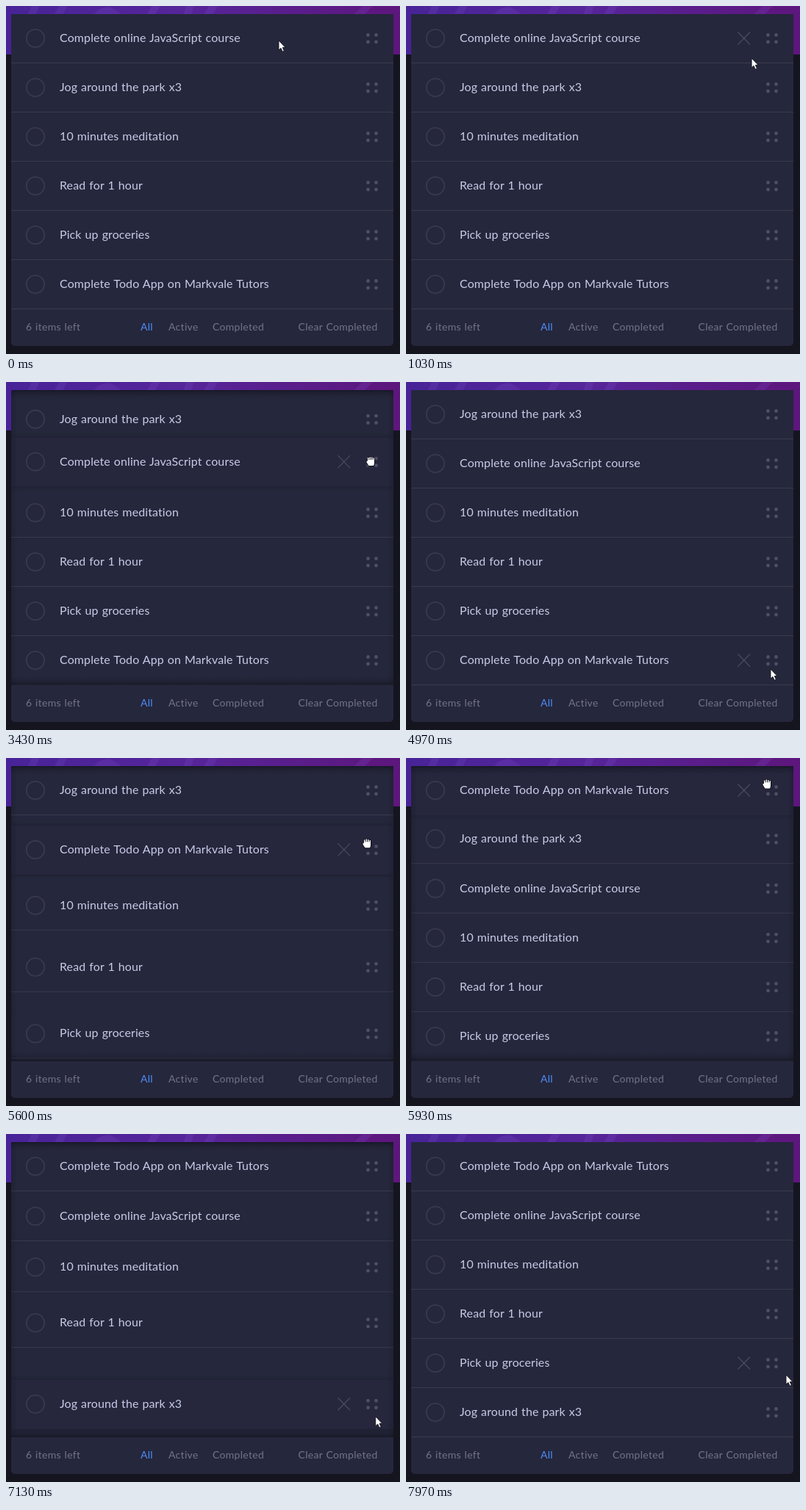
Animation, 536 px wide and 474 px high, one loop 8000 ms. Source, as an HTML page:

```html
<!DOCTYPE html>
<html lang="en">
<head>
<meta charset="utf-8">
<title>Todo list</title>
<style>
  html, body { margin: 0; width: 100%; height: 100%; overflow: hidden; background: #14151e; }
  svg { display: block; width: 100%; height: 100%; }
  text { font-family: Lato, sans-serif; white-space: pre; }
  .task { font-size: 16px; letter-spacing: .1px; word-spacing: .8px; fill: #c8cbe7; }
  .foot { font-size: 14px; letter-spacing: .3px; word-spacing: .8px; fill: #737489; }
</style>
</head>
<body>
<svg id="stage" viewBox="0 0 536 474">
  <defs>
    <linearGradient id="sky">
      <stop offset="0" stop-color="#482398"/>
      <stop offset=".45" stop-color="#56259a"/>
      <stop offset="1" stop-color="#5d167c"/>
    </linearGradient>
    <linearGradient id="fadeY" x2="0" y2="1">
      <stop offset="0" stop-color="#0b0c14" stop-opacity=".55"/>
      <stop offset=".35" stop-color="#0b0c14" stop-opacity=".22"/>
      <stop offset="1" stop-color="#0b0c14" stop-opacity="0"/>
    </linearGradient>
    <linearGradient id="fadeX">
      <stop offset="0" stop-color="#0b0c14" stop-opacity=".18"/>
      <stop offset="1" stop-color="#0b0c14" stop-opacity="0"/>
    </linearGradient>
    <filter id="lift" x="-5%" y="-30%" width="110%" height="160%">
      <feDropShadow dx="0" dy="0" stdDeviation="4.5" flood-color="#0b0c14" flood-opacity=".28"/>
    </filter>
    <clipPath id="list"><path d="M7 11H527V413H7z"/></clipPath>
  </defs>
  <path d="M0 0H536V66H0z" fill="url(#sky)"/>
  <path d="M34 14L42-4M70 14L80-4M122 16Q136-2 152 14M196 14L206-4M246 14L252-4M272 16L286-6M478 14L496-4"
    fill="none" stroke="#8b5cd6" stroke-width="10" opacity=".17"/>
  <rect x="7" y="11" width="520" height="452" rx="5" fill="#25273c"/>
  <g id="footer" class="foot"></g>
  <g clip-path="url(#list)">
    <g id="rows"></g>
    <g id="inset">
      <path d="M0 0H520V12H0z" transform="translate(7 11)" fill="url(#fadeY)"/>
      <path d="M0 0H520V12H0z" transform="matrix(1 0 0 -1 7 413)" fill="url(#fadeY)"/>
      <path d="M0 0H9V402H0z" transform="translate(7 11)" fill="url(#fadeX)"/>
      <path d="M0 0H9V402H0z" transform="matrix(-1 0 0 1 527 11)" fill="url(#fadeX)"/>
    </g>
  </g>
  <g id="cursor" fill="#fff" stroke="#11121b" stroke-width=".9" stroke-linejoin="round">
    <path id="arrow" d="M0 0V13L3 10.4L5.2 15.2L7.4 14.2L5.3 9.6H9z"/>
    <path id="open" transform="scale(1.1)" d="M-3 7.5L-6.5 2q-1.5-2.5 .5-2.5l2 2V-5a1.1 1.1 0 0 1 2.2 0v-1.5a1.1 1.1 0 0 1 2.2 0v1a1.1 1.1 0 0 1 2.2 0v2a1.1 1.1 0 0 1 2.2 0V2q0 3-1.5 5.5zM-1.8-5V0M.4-5.5V0M2.6-4V0"/>
    <path id="fist" transform="translate(.6 0) scale(1.15)" d="M-3 6L-5.5 2q-1-2.5 1-2.5V-3.5a1.1 1.1 0 0 1 2.2 0v-.8a1.1 1.1 0 0 1 2.2 0v.4a1.1 1.1 0 0 1 2.2 0v.8a1.1 1.1 0 0 1 2.2 0V2q0 2.5-1.2 4zM-2.3-3.5V-1.5M-.1-4V-1.5M2.1-3.5V-1.5"/>
  </g>
</svg>
<script>
const LOOP = 8000, STEP = 67, TOP = 44, SWAP = 31;
const $ = id => document.getElementById(id);
const show = (el, on) => { el.style.display = on ? '' : 'none'; };
const slot = i => TOP + i * STEP;

const tasks = [
  'Complete online JavaScript course', 'Jog around the park x3', '10 minutes meditation',
  'Read for 1 hour', 'Pick up groceries', 'Complete Todo App on Markvale Tutors'
];

// Pointer stops: time, x, y
const stops = [
  [0, 371, 47], [230, 371, 47], [1030, 470, 71], [1500, 508, 53], [1870, 497, 42],
  [3050, 497, 43], [3480, 496, 110], [3900, 496, 110], [4700, 497, 338], [4970, 496, 391],
  [5110, 495, 370], [5460, 494, 325], [5600, 491, 117], [5700, 491, 35], [6400, 491, 35],
  [6820, 499, 128], [6870, 499, 187], [7180, 503, 393], [7500, 503, 393], [7970, 517, 328]
];

const cursors = [
  [1900, 'arrow'], [2450, 'open'], [3900, 'fist'], [5020, 'arrow'],
  [5110, 'open'], [6150, 'fist'], [LOOP, 'arrow']
];

function slope(i, k) {
  const secant = j => (stops[j + 1][k] - stops[j][k]) / (stops[j + 1][0] - stops[j][0]);
  if (i < 1 || i > stops.length - 2) return 0;
  const a = secant(i - 1), b = secant(i);
  return a * b > 0 ? 2 * a * b / (a + b) : 0;
}

// Monotone cubic through the stops
function pointer(t, k) {
  const next = stops.findIndex(s => s[0] > t);
  if (next < 0) return stops[stops.length - 1][k];
  const a = stops[next - 1], b = stops[next];
  const h = b[0] - a[0], u = (t - a[0]) / h, v = 1 - u;
  return a[k] * (1 + 2 * u) * v * v + b[k] * u * u * (3 - 2 * u)
    + h * u * v * (slope(next - 1, k) * v - slope(next, k) * u);
}

// Neighbours give way as the dragged row reaches the middle of each one
const order = tasks.map((_, i) => i);
function makeDrag(from, to, t0, t1) {
  const dir = Math.sign(to - from), grab = pointer(t0, 2);
  const swaps = [];
  let at = t0;
  for (let k = 0; k < Math.abs(to - from); k++) {
    while (at < t1 && dir * (pointer(at, 2) - grab) < k * STEP + SWAP) at++;
    swaps.push([order[from + dir * (k + 1)], at]);
  }
  const [id] = order.splice(from, 1);
  order.splice(to, 0, id);
  return { id, to, t0, t1, dir, swaps, off: slot(from) - grab };
}
const drags = [
  makeDrag(0, 1, 3050, 3830),
  makeDrag(5, 0, 5110, 6150),
  makeDrag(1, 5, 6820, 7500)
];

function spring(ms) {
  const q = Math.max(0, ms) * .022;
  return 1 - (1 + q) * Math.exp(-q);
}

const rows = tasks.map(label => {
  const g = document.createElementNS('http://www.w3.org/2000/svg', 'g');
  const dots = [492.5, 503.5].map(x => [-4.5, 5].map(y =>
    `<circle cx="${x}" cy="${y}" r="2.4" fill="#4d5067"/>`).join('')).join('');
  g.innerHTML = `<path d="M7-33H527V34H7z" fill="#25273c"/>
    <path class="line" d="M7 33.5H527" stroke="#393a4c"/>
    <circle cx="40" r="12.2" fill="none" stroke="#393a4c" stroke-width="1.8"/>
    <text class="task" x="73" y="5">${label}</text>
    <path class="close" d="M451.5-8.5L468 8.5M468-8.5L451.5 8.5" stroke="#494c63" stroke-width="1.2"/>${dots}`;
  $('rows').append(g);
  return { g, line: g.querySelector('.line'), close: g.querySelector('.close') };
});

$('footer').innerHTML = [[27, '6 items left'], [183, 'All', '#4f8df8'], [221, 'Active'],
  [281, 'Completed'], [397.5, 'Clear Completed']].map(([x, s, c]) =>
  `<text x="${x}" y="442"${c ? ` style="fill:${c}"` : ''}>${s}</text>`).join('');

function draw(t) {
  const px = pointer(t, 1), py = pointer(t, 2);
  const ys = tasks.map((_, i) => slot(i));
  let held = -1;
  for (const d of drags) {
    if (t < d.t0) break;
    for (const [id, at] of d.swaps) ys[id] -= d.dir * STEP * spring(t - at);
    ys[d.id] = slot(d.to);
    if (t < d.t1) {
      held = d.id;
      ys[held] = Math.min(slot(5), Math.max(TOP, py + d.off));
    }
  }
  rows.forEach((r, i) => {
    const hover = held < 0 ? t >= 230 && Math.abs(py - ys[i]) < STEP / 2 : i === held;
    r.g.setAttribute('transform', `translate(0 ${ys[i].toFixed(2)})`);
    r.g.setAttribute('filter', i === held ? 'url(#lift)' : 'none');
    show(r.close, hover);
    show(r.line, i !== held);
  });
  if (held >= 0 && $('rows').lastChild !== rows[held].g) $('rows').append(rows[held].g);
  show($('inset'), held >= 0);
  const kind = cursors.find(c => t < c[0])[1];
  for (const k of ['arrow', 'open', 'fist']) show($(k), k === kind);
  $('cursor').setAttribute('transform', `translate(${px.toFixed(2)} ${py.toFixed(2)})`);
}

const start = performance.now();
function tick() {
  draw((performance.now() - start) % LOOP);
  requestAnimationFrame(tick);
}
tick();
</script>
</body>
</html>
```
